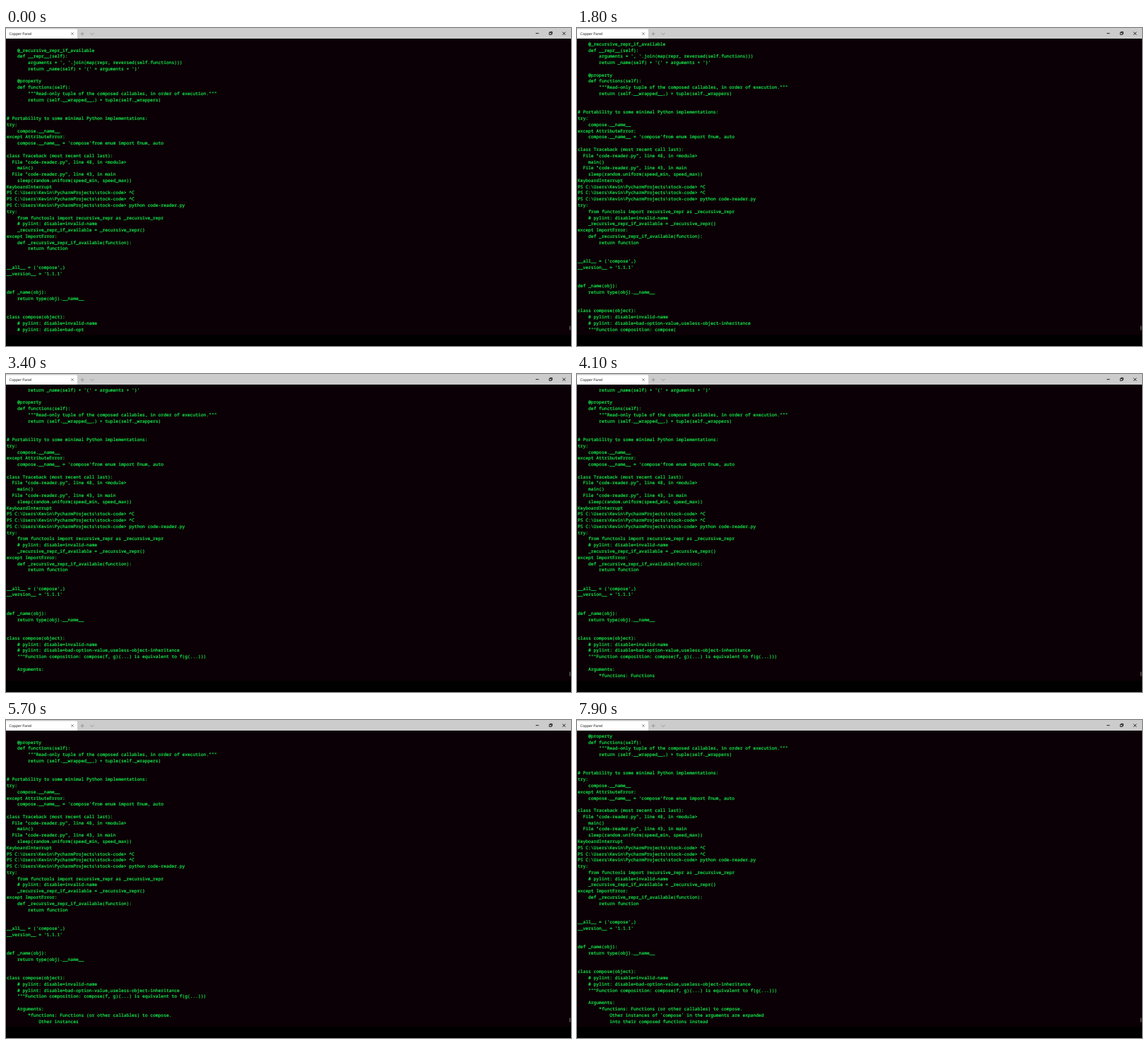
Animation, 800 px wide and 450 px high, one loop 8000 ms. Source, as an HTML page:

```html
<!DOCTYPE html>
<html lang="en">
<head>
<meta charset="utf-8">
<title>Terminal</title>
<style>
  html, body { margin: 0; width: 800px; height: 450px; overflow: hidden; background: #000; }
  body { position: relative; }
  #screen { position: absolute; top: 15px; width: 800px; height: 419px; background: #0b0005; }
  /* Laid out ten times larger so that glyph advances stay fractional. */
  pre {
    position: absolute; left: .5px; top: 18.2px; margin: 0;
    font: 62.75px/87.8px "Noto Sans Mono", "DejaVu Sans Mono", monospace;
    font-variant-ligatures: none; text-rendering: geometricPrecision;
    color: #14e04a; -webkit-text-stroke: 2.5px #14e04a;
    transform: scale(.1); transform-origin: 0 0;
  }
  svg { position: absolute; left: 0; top: 0; }
  svg text { font: 5.1px "Open Sans", sans-serif; text-rendering: geometricPrecision; }
</style>
</head>
<body>
<div id="screen"></div>
<pre id="code">

    @_recursive_repr_if_available
    def __repr__(self):
        arguments = ', '.join(map(repr, reversed(self.functions)))
        return _name(self) + '(' + arguments + ')'

    @property
    def functions(self):
        """Read-only tuple of the composed callables, in order of execution."""
        return (self.__wrapped__,) + tuple(self._wrappers)


# Portability to some minimal Python implementations:
try:
    compose.__name__
except AttributeError:
    compose.__name__ = 'compose'from enum import Enum, auto

class Traceback (most recent call last):
  File "code-reader.py", line 48, in &lt;module&gt;
    main()
  File "code-reader.py", line 43, in main
    sleep(random.uniform(speed_min, speed_max))
KeyboardInterrupt
PS C:\Users\Kevin\PycharmProjects\stock-code&gt; ^C
PS C:\Users\Kevin\PycharmProjects\stock-code&gt; ^C
PS C:\Users\Kevin\PycharmProjects\stock-code&gt; python code-reader.py
try:
    from functools import recursive_repr as _recursive_repr
    # pylint: disable=invalid-name
    _recursive_repr_if_available = _recursive_repr()
except ImportError:
    def _recursive_repr_if_available(function):
        return function


__all__ = ('compose',)
__version__ = '1.1.1'


def _name(obj):
    return type(obj).__name__


class compose(object):
    # pylint: disable=invalid-name
    # pylint: disable=bad-option-value,useless-object-inheritance
    """Function composition: compose(f, g)(...) is equivalent to f(g(...)))

    Arguments:
        *functions: Functions (or other callables) to compose.
            Other instances of `compose` in the arguments are expanded
            into their composed functions instead</pre>
<svg width="800" height="450" fill="none" stroke-width=".6">
  <path fill="#ccc" d="M0 0H800V15H0Z"/>
  <path fill="#fff" d="M0 15V1.5H99.5Q101 1.5 101 3V15Z"/>
  <text x="4.5" y="10.2" fill="#111">Copper Panel</text>
  <path stroke="#444" d="M92.2 6.3l3.6 3.6m0-3.6l-3.6 3.6"/>
  <path stroke="#777" d="M105.4 8.2h5.2M108 5.6v5.2M119.5 7l2.5 2.5 2.5-2.5"/>
  <path stroke="#000" stroke-width=".8" d="M750 7.6h4.4M769.2 6.4h3v3h-3zM770.3 6.4v-1h3v3h-1M788 5.6l4.2 4.2m0-4.2l-4.2 4.2"/>
  <path fill="#777" d="M798 421.5h1v6h-1z"/>
</svg>
<script>
  const LOOP = 8000, STEP = 100, ROWS = 47;
  const view = document.getElementById('code');
  const source = view.textContent;
  const start = source.indexOf('ion-value');

  // Typing pace: [time in ms, characters typed so far]
  const pace = [[0, 0], [1800, 74], [3400, 133], [4900, 190], [5700, 219], [6800, 269], [7900, 312]];

  function typedAt(t) {
    const i = pace.findIndex(([end], n) => n && t <= end);
    const [t0, n0] = pace[i - 1], [t1, n1] = pace[i];
    return Math.floor(n0 + (n1 - n0) * (t - t0) / (t1 - t0));
  }

  function draw(now) {
    const t = Math.floor(now % LOOP / STEP) * STEP;
    const lines = source.slice(0, start + typedAt(t)).split('\n');
    const visible = lines.slice(-ROWS).join('\n');
    if (view.textContent !== visible) view.textContent = visible;
  }

  const began = performance.now();
  function tick() {
    draw(performance.now() - began);
    requestAnimationFrame(tick);
  }
  tick();
</script>
</body>
</html>
```
